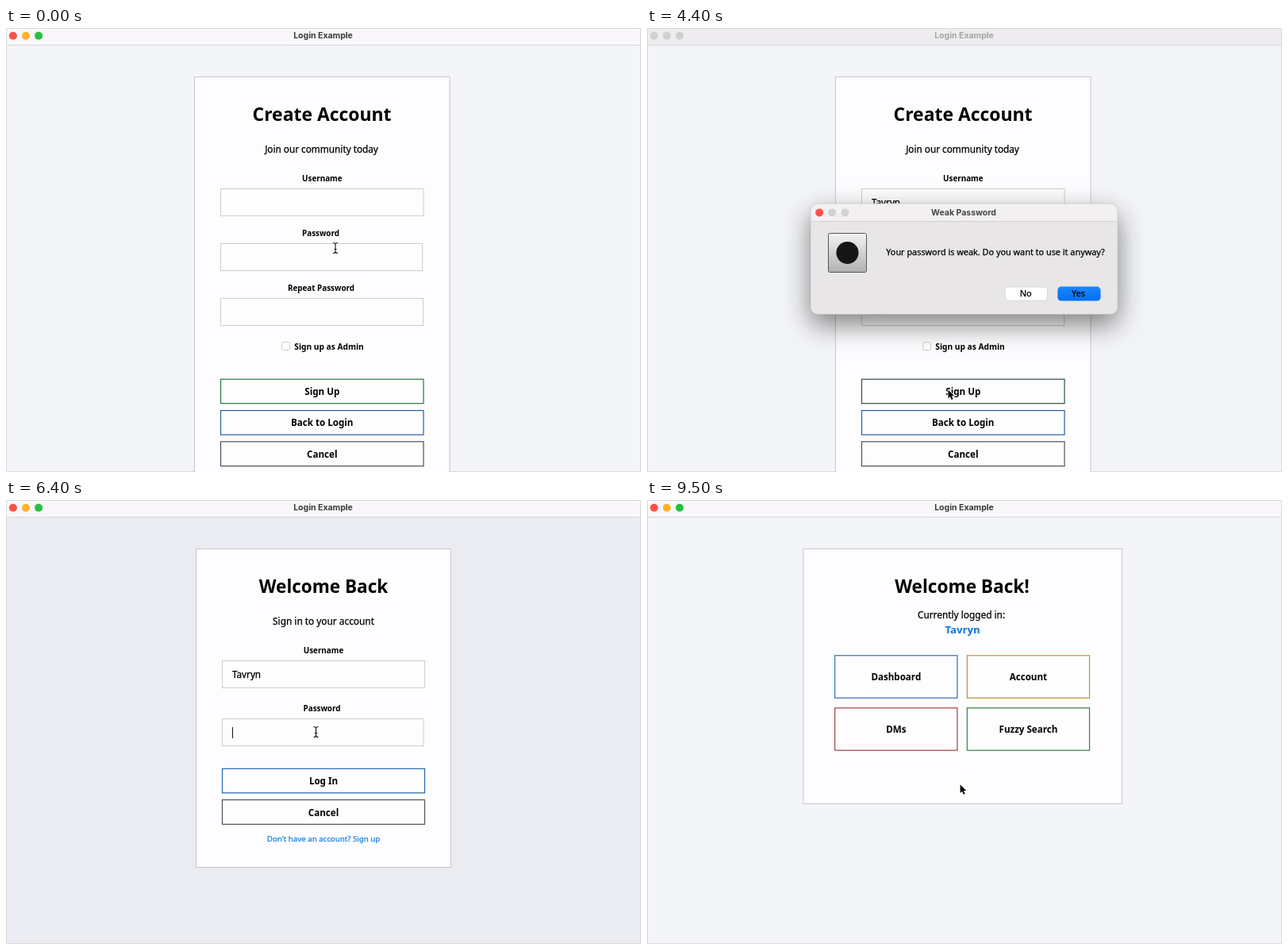
Animation of 800x559 px, one loop 9600 ms. Source, as an HTML page with a canvas:

```html
<!DOCTYPE html>
<html lang="en">
<head>
<meta charset="utf-8">
<title>Login Example</title>
<style>
  html, body { margin: 0; width: 100%; height: 100%; overflow: hidden; }
  canvas { display: block; }
</style>
</head>
<body>
<canvas id="stage" width="800" height="559"></canvas>
<script>
const ctx = document.getElementById('stage').getContext('2d');
const LOOP = 9600, STEP = 100;
const UI = '"Noto Sans", "Open Sans", sans-serif';
const TITLE_FONT = '700 10.5px Inter, sans-serif';
const USER = 'Tavryn';
const DIALOG_AT = 4300, LOGIN_AT = 5400, HOME_AT = 8800;

// Pointer path: time, x, y
const PATH = [
  [0, 415, 277], [400, 415, 219], [1500, 415, 219], [1700, 417, 288],
  [1900, 419, 316], [2100, 421, 357], [3300, 421, 357], [3700, 377.5, 497],
  [3900, 378, 497], [4200, 379.5, 455.6], [4500, 379.5, 455.6], [5100, 544, 334],
  [5300, 544, 334], [5500, 527, 338], [6200, 390.5, 292], [8200, 390.5, 292],
  [8700, 394.6, 358.3], [LOOP, 394.6, 358.3]
];

let now = 0, mouse = { x: 0, y: 0 }, shape = 'arrow';

const inside = (x, y, w, h, inset = 0) =>
  mouse.x >= x + inset && mouse.x <= x + w - inset &&
  mouse.y >= y + inset && mouse.y <= y + h - inset;

function pointerAt(t) {
  const i = PATH.findIndex(p => p[0] > t);
  const [t0, x0, y0] = PATH[i - 1], [t1, x1, y1] = PATH[i];
  const k = (t - t0) / (t1 - t0), e = k * k * (3 - 2 * k);
  return { x: x0 + (x1 - x0) * e, y: y0 + (y1 - y0) * e };
}

function text(str, x, y, font, color = '#000', align = 'center') {
  ctx.font = font;
  ctx.fillStyle = color;
  ctx.textAlign = align;
  ctx.fillText(str, x, y);
}

const bold = (str, x, y, size, color) => text(str, x, y, `700 ${size}px ${UI}`, color);

// A hairline stroke gives regular text its slightly heavier stems
function plain(str, x, y, size, color, align) {
  text(str, x, y, `400 ${size}px ${UI}`, color, align);
  ctx.strokeStyle = ctx.fillStyle;
  ctx.lineWidth = 0.25;
  ctx.strokeText(str, x, y);
}

function box(x, y, w, h, fill, stroke, line = 1) {
  ctx.fillStyle = fill;
  ctx.fillRect(x, y, w, h);
  ctx.strokeStyle = stroke;
  ctx.lineWidth = line;
  ctx.strokeRect(x, y, w, h);
}

function rounded(x, y, w, h, r, fill, stroke) {
  ctx.beginPath();
  ctx.roundRect(x, y, w, h, r);
  ctx.fillStyle = fill;
  ctx.fill();
  if (stroke) {
    ctx.strokeStyle = stroke;
    ctx.lineWidth = 1;
    ctx.stroke();
  }
}

function disc(x, y, r, color) {
  ctx.beginPath();
  ctx.arc(x, y, r, 0, Math.PI * 2);
  ctx.fillStyle = color;
  ctx.fill();
}

function gradient(y0, y1, top, bottom) {
  const g = ctx.createLinearGradient(0, y0, 0, y1);
  g.addColorStop(0, top);
  g.addColorStop(1, bottom);
  return g;
}

function lights(x, y, colors) {
  colors.forEach((c, i) => disc(x + i * 16.1, y, 5, c));
}

function card(x, y, w, h) {
  box(x, y, w, h, '#fdfcfe', '#c5c7c9');
}

function field(x, y, w, h, { keys = [], focus = Infinity, blur = Infinity, secret, value, selected }) {
  box(x, y, w, h, '#fdfdfe', '#c8cfcf');
  if (inside(x, y, w, h)) shape = 'beam';
  const left = x + 13, mid = y + h / 2;
  const count = keys.filter(k => k <= now).length;
  const shown = value || USER.slice(0, count);
  ctx.font = `400 11.7px ${UI}`;
  const width = secret ? count * 6.4 : ctx.measureText(shown).width;
  if (selected) {
    ctx.fillStyle = '#9cc7f8';
    ctx.fillRect(left - 0.5, mid - 7, width + 0.5, 14);
  }
  if (secret) {
    for (let i = 0; i < count; i++) disc(left + 3.2 + i * 6.4, mid + 0.7, 2.5, '#000');
  } else {
    plain(shown, left - 0.5, mid + 4.3, 11.7, '#000', 'left');
  }
  if (now >= focus && now < blur) {
    const last = Math.max(focus, ...keys.filter(k => k <= now));
    if ((now - last) % 1000 < 500) {
      ctx.fillStyle = '#111';
      ctx.fillRect(Math.round(left + width - 0.5), Math.round(mid - 7), 1, 14);
    }
  }
}

function button(label, x, y, w, h, color, hover) {
  box(x, y, w, h, '#fdfdfe', inside(x, y, w, h) ? hover : color, 1.2);
  if (inside(x, y, w, h, 2)) shape = 'hand';
  bold(label, x + w / 2, y + h / 2 + 4.6, 11.6);
}

function windowFrame(active, background) {
  ctx.fillStyle = background;
  ctx.fillRect(0, 0, 800, 559);
  ctx.fillStyle = active ? '#f9f7f9' : '#eeecee';
  ctx.fillRect(0, 0, 800, 21);
  ctx.fillStyle = '#d9d8da';
  ctx.fillRect(0, 21, 800, 1);
  ctx.fillRect(0, 0, 800, 1);
  ctx.fillRect(0, 0, 1, 559);
  ctx.fillRect(799, 0, 1, 559);
  ctx.fillRect(0, 558, 800, 1);
  lights(8.9, 9.7, active ? ['#fc5149', '#fdb32b', '#25c13f'] : Array(3).fill('#d1cfd1'));
  text('Login Example', 399.5, 13.2, TITLE_FONT, active ? '#3a393b' : '#a6a4a6');
}

function signUpScreen() {
  card(237.5, 61.5, 321.5, 520);
  bold('Create Account', 398, 117, 22.9);
  plain('Join our community today', 397.5, 157, 11.75);
  bold('Username', 398.3, 193, 9.85);
  field(270.5, 202.5, 255.5, 34, { keys: [700, 850, 1000, 1150, 1300, 1450], focus: 400, blur: 1700 });
  bold('Password', 396.5, 262.3, 9.85);
  field(270.5, 271.5, 254, 34, { keys: [2300, 2450, 2600], focus: 1700, blur: 2800, secret: true });
  bold('Repeat Password', 397, 331.4, 9.85);
  field(270.5, 340.5, 255, 34, { keys: [2900, 3050, 3200], focus: 2800, blur: DIALOG_AT, secret: true });
  rounded(347.5, 395.5, 10, 10, 2.5, '#fff', '#cfced0');
  bold('Sign up as Admin', 407, 404.8, 10.2);
  button('Sign Up', 270.5, 442.2, 255.5, 30.5, '#23793a', '#2c5638');
  button('Back to Login', 270.5, 481.6, 255.5, 30.5, '#2461a2', '#2c4c74');
  button('Cancel', 270.5, 520.8, 255.5, 30.7, '#505155', '#333');
}

function weakPasswordDialog() {
  ctx.save();
  ctx.shadowColor = 'rgba(0,0,0,0.5)';
  ctx.shadowBlur = 34;
  ctx.shadowOffsetY = 13;
  rounded(206, 221, 387, 139.5, 9, '#e9e6e7');
  ctx.restore();
  rounded(206, 221, 387, 22, [9, 9, 0, 0], '#f3f0f2');
  ctx.fillStyle = '#d3d0d2';
  ctx.fillRect(206, 243, 387, 1);
  ctx.beginPath();
  ctx.roundRect(206, 221, 387, 139.5, 9);
  ctx.strokeStyle = '#bcb9bb';
  ctx.lineWidth = 0.6;
  ctx.stroke();
  lights(217.2, 232.4, ['#fc5149', '#d3d1d3', '#d3d1d3']);
  text('Weak Password', 399, 235.8, TITLE_FONT, '#454446');
  rounded(228.5, 258.5, 48, 49, 2, gradient(258, 308, '#f4f4f4', '#b0b0b0'), '#555');
  disc(252.5, 283, 14, '#161616');
  plain('Your password is weak. Do you want to use it anyway?', 439, 285.6, 10.86);
  rounded(451, 326, 53.5, 17.5, 4.5, '#fff', '#d8d6d7');
  plain('No', 477.2, 338.3, 11);
  rounded(517.3, 325.6, 54.2, 18, 4.5, gradient(326, 343, '#1c86ff', '#0070f6'));
  plain('Yes', 543.5, 338.3, 11);
}

function loginScreen() {
  card(239.5, 61.5, 321, 401);
  bold('Welcome Back', 400, 117, 22.5);
  plain('Sign in to your account', 400, 157, 11.85);
  bold('Username', 400, 193, 9.85);
  field(272.5, 202.5, 255, 34, { value: USER, selected: now < 6200 });
  bold('Password', 398, 266.3, 9.85);
  field(272.5, 275.5, 253.5, 34, { keys: [7200, 7500, 8000], focus: 6200, secret: true });
  button('Log In', 272.5, 338.3, 255, 30.5, '#2464a8', '#2d5078');
  button('Cancel', 272.5, 377.5, 255, 30.8, '#505155', '#333');
  plain("Don't have an account? Sign up", 400, 430.3, 9.7, '#1580e0');
}

function homeScreen() {
  card(197, 61.5, 401.5, 321);
  bold('Welcome Back!', 397, 117, 22.6);
  plain('Currently logged in:', 396, 149, 11.85);
  bold(USER, 397.5, 168, 13.2, '#0f73dd');
  button('Dashboard', 236.7, 195.8, 154.2, 53.4, '#2f6fb2', '#2c4c74');
  button('Account', 403.3, 195.8, 154.2, 53.4, '#b8913a', '#8a6d2c');
  button('DMs', 236.7, 261.8, 154.2, 53.4, '#a53f45', '#7a3035');
  button('Fuzzy Search', 403.3, 261.8, 154.2, 53.4, '#347f41', '#2c5638');
}

function outline(points, fill, stroke, width) {
  ctx.beginPath();
  points.forEach(([x, y]) => ctx.lineTo(x, y));
  ctx.closePath();
  ctx.lineWidth = width;
  ctx.strokeStyle = stroke;
  ctx.stroke();
  ctx.fillStyle = fill;
  ctx.fill();
}

const cursors = {
  arrow() {
    outline([[0, 0], [0, 10.6], [2.4, 8.4], [4.2, 12.5], [6, 11.7], [4.3, 7.7], [7.6, 7.7]], '#000', '#fff', 1.6);
  },
  beam() {
    const stem = new Path2D('M-3-6.5Q0-6.5 0-4.5Q0-6.5 3-6.5M0-5V5M-3 6.5Q0 6.5 0 4.5Q0 6.5 3 6.5M-1.5 1.5H1.5');
    ctx.lineWidth = 2.4;
    ctx.strokeStyle = 'rgba(255,255,255,0.8)';
    ctx.stroke(stem);
    ctx.lineWidth = 1.1;
    ctx.strokeStyle = '#111';
    ctx.stroke(stem);
  },
  hand() {
    const palm = new Path2D('M-1 0Q0-1.5 1.2 0L2.4 4Q3.4 2.6 4 4Q5 2.8 5.8 4.6Q7.4 3.6 7.8 5.6L8.3 9L7.2 13H1.8L-2.4 8Q-2.8 6.4-1 7L0.2 8Z');
    ctx.fillStyle = '#fff';
    ctx.fill(palm);
    ctx.lineWidth = 1.1;
    ctx.strokeStyle = '#111';
    ctx.stroke(palm);
    ctx.lineWidth = 0.7;
    ctx.stroke(new Path2D('M2.8 8.5V11M4.6 8.5V11M6.3 8.5V11'));
  }
};

function draw(t) {
  now = t;
  mouse = pointerAt(t);
  shape = 'arrow';
  const dialog = t >= DIALOG_AT && t < LOGIN_AT;
  const login = t >= LOGIN_AT && t < HOME_AT;
  windowFrame(!dialog, login ? '#ebecf1' : '#f4f5f8');
  if (t < LOGIN_AT) signUpScreen();
  else if (login) loginScreen();
  else homeScreen();
  if (dialog) {
    weakPasswordDialog();
    shape = 'arrow';
  }
  ctx.save();
  ctx.translate(mouse.x, mouse.y);
  ctx.lineJoin = 'round';
  cursors[shape]();
  ctx.restore();
}

function tick() {
  draw(Math.floor((performance.now() % LOOP) / STEP) * STEP);
  requestAnimationFrame(tick);
}
tick();
</script>
</body>
</html>
```
